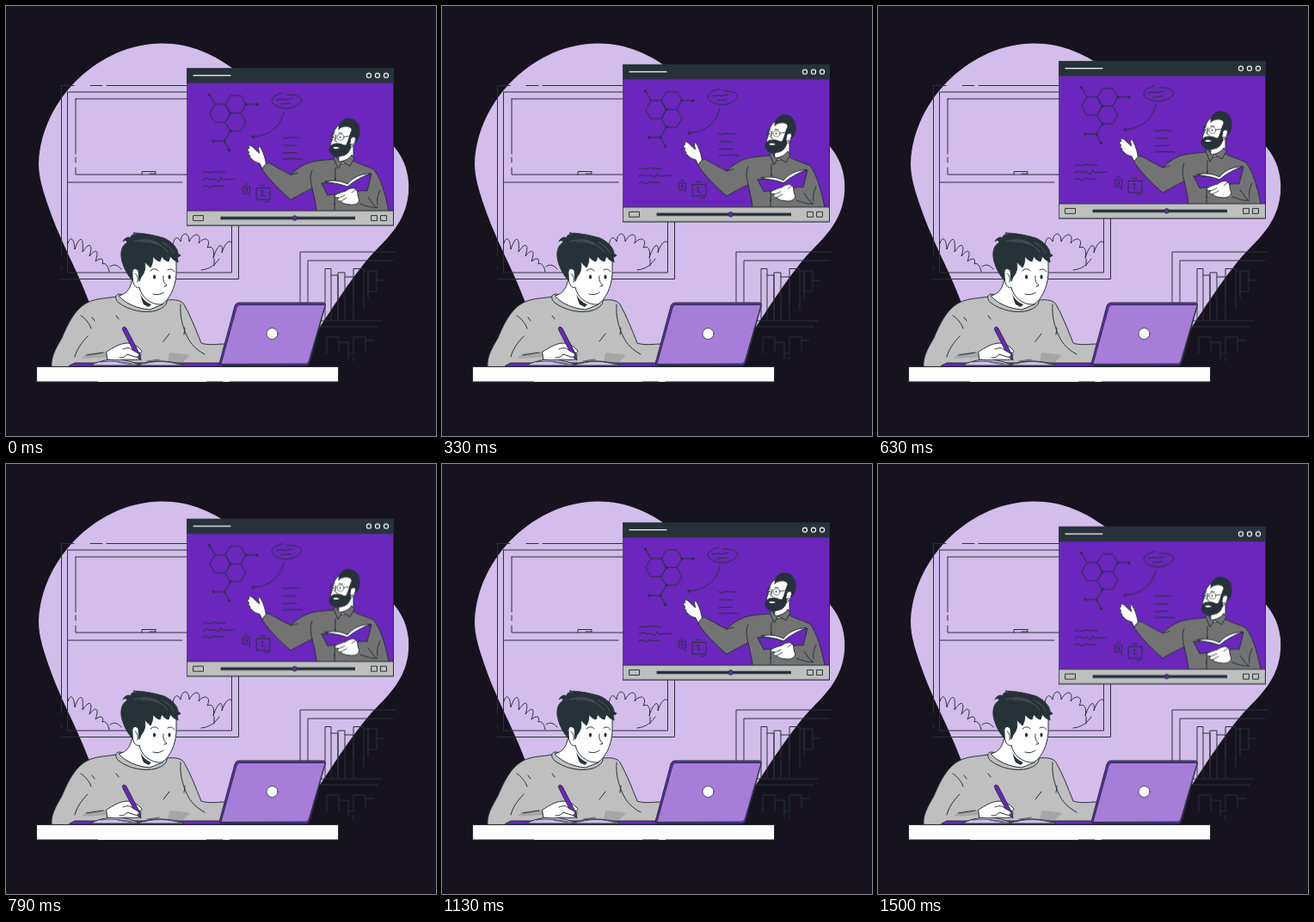
An HTML page that plays this animation: 500 by 500 pixels, repeating every 1.54 s.

```html
<!DOCTYPE html>
<html lang="en">
<head>
<meta charset="utf-8">
<title>Online lesson</title>
<style>
  html, body { margin: 0; width: 100%; height: 100%; overflow: hidden; background: #16131e; }
  svg { display: block; width: 100vw; height: 100vh; }
  .line { fill: none; }
  .ink { fill: #263238; }
  .white { fill: #fff; }
  .purple { fill: #6b26be; }
  .lilac { fill: #a67dd8; }
  .pale { fill: #d3bdeb; }
  .grey { fill: #bfbfbf; }
  .dim { fill: #737373; }
  .bare { stroke: none; }
  #player { animation: float 1540ms linear infinite; }
  @keyframes float {
    0%, 100% { transform: translateY(.1px); }
    46.8% { transform: translateY(-9.3px); }
    97.4% { transform: translateY(.6px); }
  }
</style>
</head>
<body>
<svg viewBox="0 0 500 500" stroke="#263238" stroke-linecap="round" stroke-linejoin="round">
  <path class="pale bare" d="M181 43.500C215 43.500 243 56 272 79C320 112 405 124 440 153C462 170 470 194 468 217C466 245 450 264 432 282C410 304 384 344 362 378L345 418H118C112 385 106 365 97 345C84 310 62 270 51 238C43 215 38 200 38 183C41 107 110 43.500 181 43.500Z"/>

  <g id="room" class="line">
    <path d="M64.5 92.5H79M98 92.5H112M117 92.5H240M64.5 92.5V290M64.5 304V307M64.5 317.5H270.5V200M71.5 100H240M71.5 100V310H262.5V200M71.5 205H205M81 108H240M81 108V172M81 176V182M81 188V196H240"/>
    <path d="M158 196V192.500H174V195H167"/>
    <path d="M72 276C74 268 79 268 80 283C85 267 91 267 89 286C96 275 102 275 97 291C104 282 109 283 104 297C110 292 114 293 112 300C115 298 119 302 120 309M121 303C126 299 131 302 134 306"/>
    <path d="M194 283C194 267 200 267 203 274C204 262 213 262 213 274C219 262 228 264 224 276C231 267 239 271 234 281C240 278 243 284 241 293C246 276 253 274 251 287C255 273 262 272 262 275M227 307C237 306 243 301 248 294M242 294V302"/>
    <path d="M342 346V286H454M351 346V296H450M362 373H432M366 366H437M371 365V305.500H378V365M378 313H386V365M386 365V310H394V365M394 315H404V365M404 340V305.500H416V353M416 308H421V340M421 332V308H431V332H421M431 319H440"/>
    <path d="M373 404V385H387V403M387 391H398V410M398 404H404V385H418V401M418 389H427M404 408V413"/>
  </g>

  <g id="player">
    <rect class="purple" x="210.500" y="72.500" width="240" height="182.500"/>
    <path class="ink" d="M210.500 72.500H450.500V89H210.500Z"/>
    <path stroke="#fff" stroke-width="1.300" d="M218 80.700H261"/>
    <g class="line" stroke="#fff" stroke-width="1.100">
      <circle cx="422" cy="80.700" r="2.600"/><circle cx="432" cy="80.700" r="2.600"/><circle cx="442" cy="80.700" r="2.600"/>
    </g>

    <g id="board" class="line">
      <path d="M255 114L261 104H273L279 114L273 124.500H261ZM237 124.500L243 114H255L261 124.500L255 135H243ZM255 135L261 124.500H273L279 135L273 145H261ZM243 114L236.500 103M279 114H292M261 145L254 157H241M254 157L259.500 167.500"/>
      <g class="ink bare">
        <circle cx="236.500" cy="103" r="1.600"/><circle cx="292" cy="114.300" r="1.600"/><circle cx="241" cy="157" r="1.600"/><circle cx="259.500" cy="167.500" r="1.600"/><circle cx="261" cy="145" r="1.500"/><circle cx="254" cy="157" r="1.500"/><circle cx="261" cy="124.500" r="1.500"/><circle cx="279" cy="114.300" r="1.300"/>
      </g>
      <path d="M327 103C336 102 345 106 344 110C340 117 330 119 325 119C315 118 309 114 309 110C310 105 316 102 322 101M314 109L322 108L325 109L333 107M320 114L331 113M323 123C320 138 308 151 286 152M288.500 150L285.500 152L289 153.500"/>
      <path d="M321 152L324 154L328 152.500L341 153M323 162H338M322 171L330 170.500H338M322 178L334 177.500L345 178"/>
      <path d="M229 194L233 192.500L237 194L241 192.500L255 193.500M229 202L234 200L239 202L243 201L247 204L250 199L252 202L266 201M229 210L233 208.500L237 211L240 209L253 209.500"/>
      <path d="M275.500 210H283.500V218H276ZM278 213L280 212L281 215H278M282 220L284 221M291.500 211.500H307V225H291.500ZM296 215H299L297 220L301 221M296 208.500H301M301 228L306 227M278 207H281"/>
    </g>

    <g id="teacher">
      <path class="white" d="M303 187C302 179 300 172 297 166C295 162 292 163 294 168L294.500 171L286 163C283 161 281 163 283 165L281 166C280 168 282 169 283 170C281 171 282 173 284 174C283 175 284 177 286 178C288 181 292 182 295 183L298 189Z"/>
      <path class="dim" d="M361 238C360 228 358 220 356 212C347 216 339 221 331 225C319 215 307 203 298 190C299 186 302 183 305 182C314 187 323 192 331 196C339 188 349 182 359 180.500C367 179 374 179 381 178L402 179C411 184 420 186 428 190C436 201 441 218 445 238Z"/>
      <path class="line" d="M356 212C354 204 353 197 356 191M331 196L339 194M383 188L382 238M421 222C425 227 427 232 431 234M412 230C420 233 426 235 432 234M435 214C432 220 431 226 432 231"/>
      <path class="white" d="M388 167L386 184C394 184 401 181 404 174V157H390Z"/>
      <path class="dim" d="M381 177L386 189L391 181L400 186L405 177L402 173C399 178 393 180 388 181L384 175Z"/>
      <path class="white" d="M388 138C381 142 380 150 379 155L377 162L383 169H396L406 160V140Z"/>
      <path class="ink" d="M387 143C387 135 393 130 400 131C409 132 412 141 411 149C410 155 408 157 406 158C405 154 403 151 401 153L401 160C401 168 397 173 391 174C383 176 377 173 376 168C376 163 379 160 384 160C390 159 394 164 396 161C399 155 400 148 402 145C403 139 392 138 387 143Z"/>
      <path class="white" d="M401 154C404 150 408 153 406 157C405 161 402 162 400 160Z"/>
      <path class="white bare" d="M380 164.500C383 163 386 164 388 165C385 166.500 382 166.500 380 164.500Z"/>
      <path class="line" stroke-width=".8" d="M384 150L382.500 157L385 158M379 148L382 147.500M387 147.500L391 148M393 152L400 151"/>
      <circle class="line" cx="380.500" cy="152.500" r="3.200" stroke-width=".6"/><circle class="line" cx="389" cy="152.500" r="3.800" stroke-width=".6"/>
      <circle class="ink bare" cx="381" cy="152.500" r=".9"/><circle class="ink bare" cx="388.500" cy="152.500" r=".9"/>
      <path class="purple" d="M367 206L374 220C383 218 391 219 397 222C405 215 413 214 420 215L425 195C415 197 405 202 397 210C388 206 376 205 367 206Z"/>
      <path class="white" d="M371 204C380 202 390 203 397 207C403 199 413 195 424 194.500C415 198 405 203 397 210C388 206 378 206 371 204Z"/>
      <path class="white" d="M382 220C388 217 391 216 395 215C400 211 405 211 407 213C410 216 408 219 410 223C412 227 409 230 404 231C397 231 392 230 389 227C386 227 384 225 387 223C384 223 382 222 382 220Z"/>
      <path class="line" stroke-width=".8" d="M387 223L394 220M389 227L396 223M407 213L402 217"/>
      <circle class="ink bare" cx="382" cy="230" r=".9"/><circle class="ink bare" cx="383" cy="201" r=".9"/>
    </g>

    <path class="grey" d="M210.500 238H450.500V255H210.500Z"/>
    <path class="line" d="M218 243.500H229.500V249.500H218ZM425 243.500H431.500V249.500H425ZM436 243.500H442.500V249.500H436Z"/>
    <path stroke-width="3.400" stroke-linecap="butt" d="M249.500 246.500H406"/>
    <circle class="purple" cx="335.700" cy="246.500" r="2.700"/>
  </g>

  <g id="student">
    <path class="grey" d="M53 419C52 408 58 398 65 386C73 367 82 349 99 343C110 339 122 340 131 337L187 342C196 341 204 342 207 347C215 361 221 377 227 392C236 395 245 393 255 393L249 419Z"/>
    <path class="bare" fill="#a6a6a6" d="M92 405C102 402 110 403 117 402L118 408L88 410ZM190 403C198 404 206 404 214 406L206 414H188Z"/>
    <path class="line" d="M87 360C92 363 97 369 99 375M100 362L103 366M95 384C87 392 82 400 80 408M203 347C202 360 205 372 210 383C215 394 222 400 231 405M190 381L183 390M208 374L207 382M128 360L131 364M113 403L94 406"/>
    <path class="grey" d="M131 335C126 336 127 341 131 345C143 354 161 358 175 354C184 351 188 346 187 342Z"/>
    <path class="white" d="M147 315C146 327 141 335 131 337C140 347 154 352 167 353L182 347V330L160 312Z"/>
    <path class="ink bare" d="M156 334C158 340 163 345 169 347L166 350L160 347C158 343 157 338 156 334Z"/>
    <path class="white" d="M152 306C146 302 143 310 147 317C148 324 151 329 155 327C157 338 168 348 181 347C190 342 197 327 198 312L198 287L165 285Z"/>
    <path class="ink" d="M147 319C143 315 138 307 136 300C133 292 132 280 141 275C140 272 138 272 136 274C138 269 143 268 146 270C144 267 147 265 152 266C151 264 149 264 148 264C158 264 171 266 184 270C193 274 200 282 200 288L203 290C201 292 199 292 199 292L200 298C196 296 193 294 191 291L189 297C185 296 183 294 181 291L179 297C175 296 173 294 171 291C171 296 170 301 168 304C165 302 163 299 161 297C163 304 161 311 157 315L155 320L154 308C151 303 146 305 147 312Z"/>
    <path class="line" stroke="#71787d" stroke-width=".6" d="M149 274C158 271 168 271 177 276M157 274C170 273 182 277 188 286M182 275C188 278 193 282 195 287"/>
    <path class="line" d="M150 311C153 313 154 317 153 321M183 314C182 319 184 322 187 325L184 326M171 335C175 336 179 336 183 333M168 308C171 305 175 305 177 308M188 307C191 305 194 306 196 309"/>
    <ellipse class="ink bare" cx="172.500" cy="315" rx="1.600" ry="2.600"/><ellipse class="ink bare" cx="190" cy="315" rx="1.600" ry="2.600"/>
  </g>

  <g id="desk">
    <path class="purple" d="M74 418L80 415H251V419H74Z"/>
    <path class="pale" d="M100 417C110 412 120 411 130 411C140 412 148 414 155 417C170 411 188 412 206 417V418H100Z"/>
    <path class="line" stroke-width=".7" d="M110 414C125 412 140 414 155 418M164 413L178 411M160 416C175 412 189 413 202 417M130 414L146 417"/>
    <path class="white" d="M117 402C125 397 131 393 140 392C147 392 152 395 156 399C159 401 158 404 155 403C158 405 158 408 154 407L155 411C149 412 143 411 138 411C131 412 123 412 118 411Z"/>
    <path class="purple" d="M135.500 376C134.500 373 138 372 140 375L156 406L157 412L152 408Z"/>
    <path class="white" d="M136 399C141 397 144 397 147 400L154 404C156 407 153 409 150 408L141 405C139 408 136 409 132 409"/>
    <path class="purple" d="M248 416L266 349C267 346 269 345 271 345H369C371 345 372 347 371 349L353.500 413C352.500 416 351 418 349 418H251Z"/>
    <path class="lilac" d="M250 416L268 351C269 348 271 347.500 273 347.500H369C371 347.500 371 349 370.500 350L352.500 412C351.500 415 350 416 348 416Z"/>
    <circle class="white" cx="309.500" cy="381" r="6.500" stroke-width=".8"/>
    <rect class="white" x="36" y="419.500" width="350.500" height="17.500"/>
    <path stroke="#fff" stroke-linecap="butt" d="M107 436.500H233M252 436.500H260"/>
  </g>
</svg>
</body>
</html>
```
